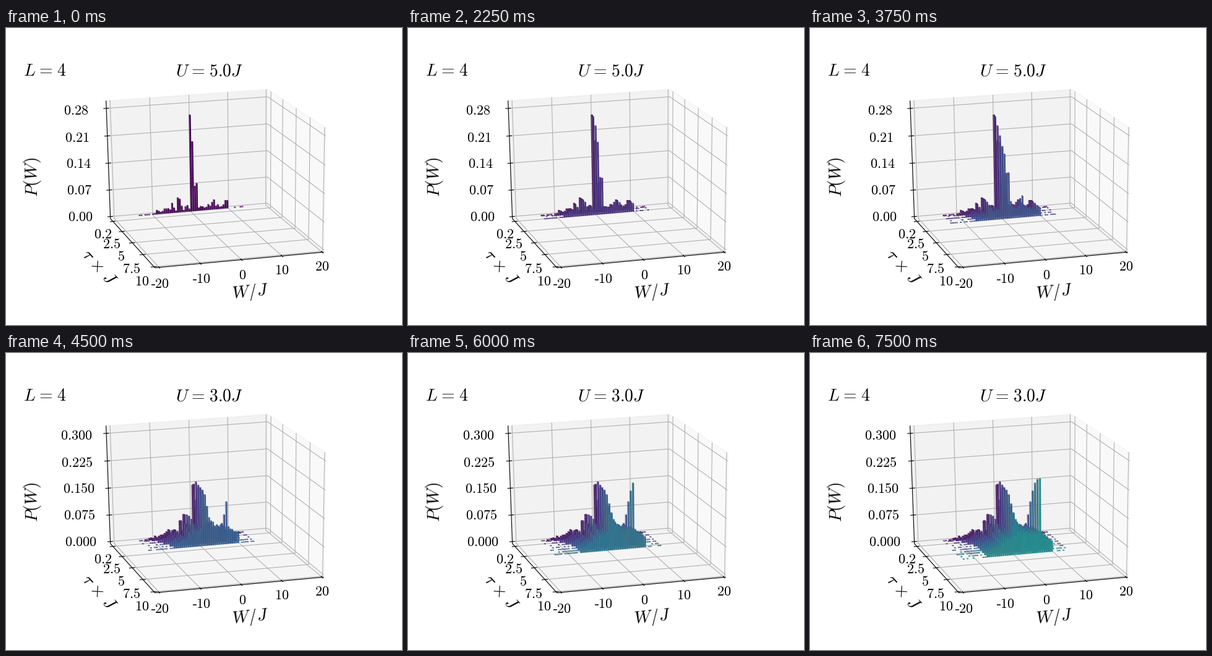
Recreate the animation shown at these times as a matplotlib script. Size 640 by 480 pixels, loop 8 s.

```python
import numpy as np
import matplotlib.pyplot as plt
from matplotlib.animation import FuncAnimation
from matplotlib.collections import PolyCollection

plt.rcParams["mathtext.fontset"] = "cm"

fig = plt.figure(figsize=(6.4, 4.8), dpi=100, facecolor="white")
ax = fig.add_axes([0, 0, 1, 1])
ax.set_xlim(0, 640)
ax.set_ylim(480, 0)
ax.axis("off")

# Camera: unit box corners and where they land on the stage
BOX = [(0, 0, 0), (1, 0, 0), (1, 1, 0), (0, 1, 0), (0, 0, 1), (1, 0, 1), (1, 1, 1)]
STAGE = [(168, 306), (424, 288), (512, 361), (241, 389),
         (162, 118), (421.5, 98.5), (518, 161)]


def fit_camera():
    rows, rhs = [], []
    for p, q in zip(BOX, STAGE):
        h = [*(np.array(p) - 0.5), 1]
        for axis in (0, 1):
            s = q[axis] / 100
            row = np.zeros(11)
            row[4 * axis:4 * axis + 4] = h
            row[8:] = -s * np.array(h[:3])
            rows.append(row)
            rhs.append(s)
    sol = np.linalg.lstsq(np.array(rows), np.array(rhs), rcond=None)[0]
    return np.append(sol, 1).reshape(3, 4)


CAM = fit_camera()


def project(points):
    p = np.asarray(points, float) - 0.5
    q = p @ CAM[:, :3].T + CAM[:, 3]
    return 100 * q[..., :2] / q[..., 2:]


def line(points, color, z=2):
    xy = project(points)
    ax.plot(xy[:, 0], xy[:, 1], color=color, lw=0.8, zorder=z,
            solid_capstyle="butt")


def box_x(w):
    return (w + 21) / 41.4


def box_y(tau):
    return (tau + 0.45) / 10.65


Z0, DZ = 0.018, 0.2295
X_TICKS = [box_x(w) for w in (-20, -10, 0, 10, 20)]
Y_TICKS = [box_y(t) for t in (0.2, 2.5, 5, 7.5, 10)]
Z_TICKS = [Z0 + DZ * k for k in range(5)]


def draw_box():
    panes = [
        ([(0, 0, 0), (1, 0, 0), (1, 0, 1), (0, 0, 1)], 0.95),
        ([(1, 0, 0), (1, 1, 0), (1, 1, 1), (1, 0, 1)], 0.975),
        ([(0, 0, 0), (1, 0, 0), (1, 1, 0), (0, 1, 0)], 0.9625),
    ]
    for corners, grey in panes:
        ax.add_collection(PolyCollection(
            [project(corners)], facecolors=str(grey),
            edgecolors=str(grey - 0.02), linewidths=0.8, zorder=1))
    grid = "#b0b0b0"
    for x in X_TICKS:
        line([(x, 1, 0), (x, 0, 0), (x, 0, 1)], grid)
        line([(x, 0.98, 0), (x, 1.02, 0)], "black", 3)
    for y in Y_TICKS:
        line([(0, y, 0), (1, y, 0), (1, y, 1)], grid)
        line([(-0.019, y, 0), (0.016, y, 0)], "black", 3)
    for z in Z_TICKS:
        line([(0, 0, z), (1, 0, z), (1, 1, z)], grid)
        line([(-0.018, 0, z), (0.016, 0, z)], "black", 3)
    line([(0, 0, 1), (0, 0, 0), (0, 1, 0), (1, 1, 0)], "black", 3)


def label(x, y, s, size=16, ha="center", va="baseline", rot=0):
    return ax.text(x, y, f"${s}$", fontsize=size, ha=ha, va=va,
                   rotation=rot, color="black", zorder=20)


def equation(name, value):
    return rf"{name}\hspace{{0.08}} = \hspace{{0.08}}{value}"


def draw_labels():
    for x, y, s in [(251.5, 419.5, "20"), (319, 411.5, "10"), (382, 405.5, "0"),
                    (446, 397.5, "10"), (511, 392.5, "20")]:
        label(x, y, s)
    for x, y in [(235, 414.6), (302, 406.6)]:
        ax.plot([x, x + 6], [y, y], color="black", lw=1.1,
                solid_capstyle="butt", zorder=20)
    for x, y, s in [(157, 340, "0.2"), (171, 356, "2.5"), (186.5, 375.5, "5"),
                    (203, 395.5, "7.5"), (220, 415.5, "10")]:
        label(x, y, s)
    label(28, 77, equation("L", 4), 20, "left")
    label(395, 427, "W/J", 20, va="center", rot=6)
    label(151, 386.5, r"\tau\hspace{0.12} \times \hspace{0.12}J", 20,
          va="center", rot=-48)
    label(42.5, 241, "P(W)", 20, va="center", rot=91)


draw_box()
draw_labels()
title = label(274, 78, equation("U", "5.0J"), 20, "left")
z_labels = [label(x, y, "0") for x, y in
            [(120.5, 311.5), (118.5, 269), (117.5, 226.5), (115, 184), (113.5, 140.5)]]

BINS = np.arange(-28, 27)
TAUS = [0.2, 0.3] + [0.5 * k for k in range(1, 10)]

# Shape of P(W) per U. Pairs run from the first row to the settled one;
# "spike" holds heights and widths at key taus, "bumps" (bin, first, last).
SHAPES = {
    5: dict(step=0.07, digits=2, settle=2.0, turn=(1.2, 0.35), edge=-1,
            level=(7, 17), mid=(0, 4), spread=(25, 18), lo=(-21, -15), hi=(18, 18),
            spike=([0.2, 0.5, 1, 2], [145, 142, 128, 99], [1.7, 1.8, 2.1, 2.7]),
            bumps=[(-7.5, 36, 16), (-11, 11, 0), (2, 30, 27), (9, 0, 22),
                   (10.5, 18, 0), (17.5, 18, 8)]),
    3: dict(step=0.075, digits=3, settle=2.5, turn=(2.65, 0.55), edge=0,
            level=(12, 32), mid=(-5, 5), spread=(15, 15.5), lo=(-24, -15), hi=(20, 18),
            spike=([0.2, 1, 1.5, 2.5, 4.5], [79, 83, 76, 58, 5],
                   [1, 1.8, 2.1, 2.7, 3]),
            bumps=[(-5, 28, 2), (-7, 8, 0), (12, 0, 92)]),
}


def heights(u, tau):
    """Bar heights in stage pixels for one row."""
    s = SHAPES[u]
    t = min((tau - 0.2) / (s["settle"] - 0.2), 1)
    level, mid, spread, lo, hi = (
        a + (b - a) * t for a, b in
        (s[key] for key in ("level", "mid", "spread", "lo", "hi")))
    rough = np.random.default_rng(u).uniform(-0.65, 0.65, len(BINS))
    h = level * np.exp(-((BINS - mid) / spread) ** 2)
    h *= 1 + rough * (1 - 0.8 * t)

    # Only faint dashes remain beyond the support
    dashes = np.random.default_rng(100 * u + int(10 * tau)).random(len(BINS)) < 0.6
    h = np.where((BINS >= lo) & (BINS <= hi), h, dashes)

    keys, tops, widths = s["spike"]
    d = BINS - s["edge"]
    spike = np.interp(tau, keys, tops) * np.exp(-(d / np.interp(tau, keys, widths)) ** 2)
    h += np.where(d >= 0, spike, 0)

    turn, pace = s["turn"]
    ease = 1 / (1 + np.exp((turn - tau) / pace))
    for centre, first, last in s["bumps"]:
        h += (first + (last - first) * ease) * np.exp(-((BINS - centre) / 0.6) ** 2)
    return h


def bar_row(u, k):
    tau = TAUS[k]
    base = np.array(plt.get_cmap("viridis")(k / 21)[:3])
    y0, y1 = box_y(tau - 0.35), box_y(tau - 0.23)
    polys, faces = [], []
    for j, h in zip(BINS[::-1], heights(u, tau)[::-1]):
        if h < 0.4:
            continue
        w = 0.5 * j + 0.22
        x0, x1 = box_x(w - 0.2), box_x(w + 0.2)
        z = Z0 + DZ * h / 43.2
        polys += [
            [(x0, y0, z), (x1, y0, z), (x1, y1, z), (x0, y1, z)],
            [(x0, y0, Z0), (x0, y1, Z0), (x0, y1, z), (x0, y0, z)],
            [(x0, y1, Z0), (x1, y1, Z0), (x1, y1, z), (x0, y1, z)],
        ]
        faces += [base, 0.4 * base + 0.3, base]
    row = PolyCollection(project(polys), facecolors=faces, linewidths=0,
                         zorder=5 + 0.1 * k, visible=False)
    ax.add_collection(row)
    return row


ROWS = {5: [bar_row(5, k) for k in range(6)],
        3: [bar_row(3, k) for k in range(11)]}


def update(i):
    last = min(i // 3, 10)
    u = 5 if last < 6 else 3
    shape = SHAPES[u]
    title.set_text(f"${equation('U', f'{u}.0J')}$")
    for k, text in enumerate(z_labels):
        text.set_text(f"${k * shape['step']:.{shape['digits']}f}$")
    for key, rows in ROWS.items():
        for k, row in enumerate(rows):
            row.set_visible(key == u and k <= last)
    return []


anim = FuncAnimation(fig, update, frames=32, interval=250, repeat=True,
                     repeat_delay=0, blit=False)
plt.show()
```
